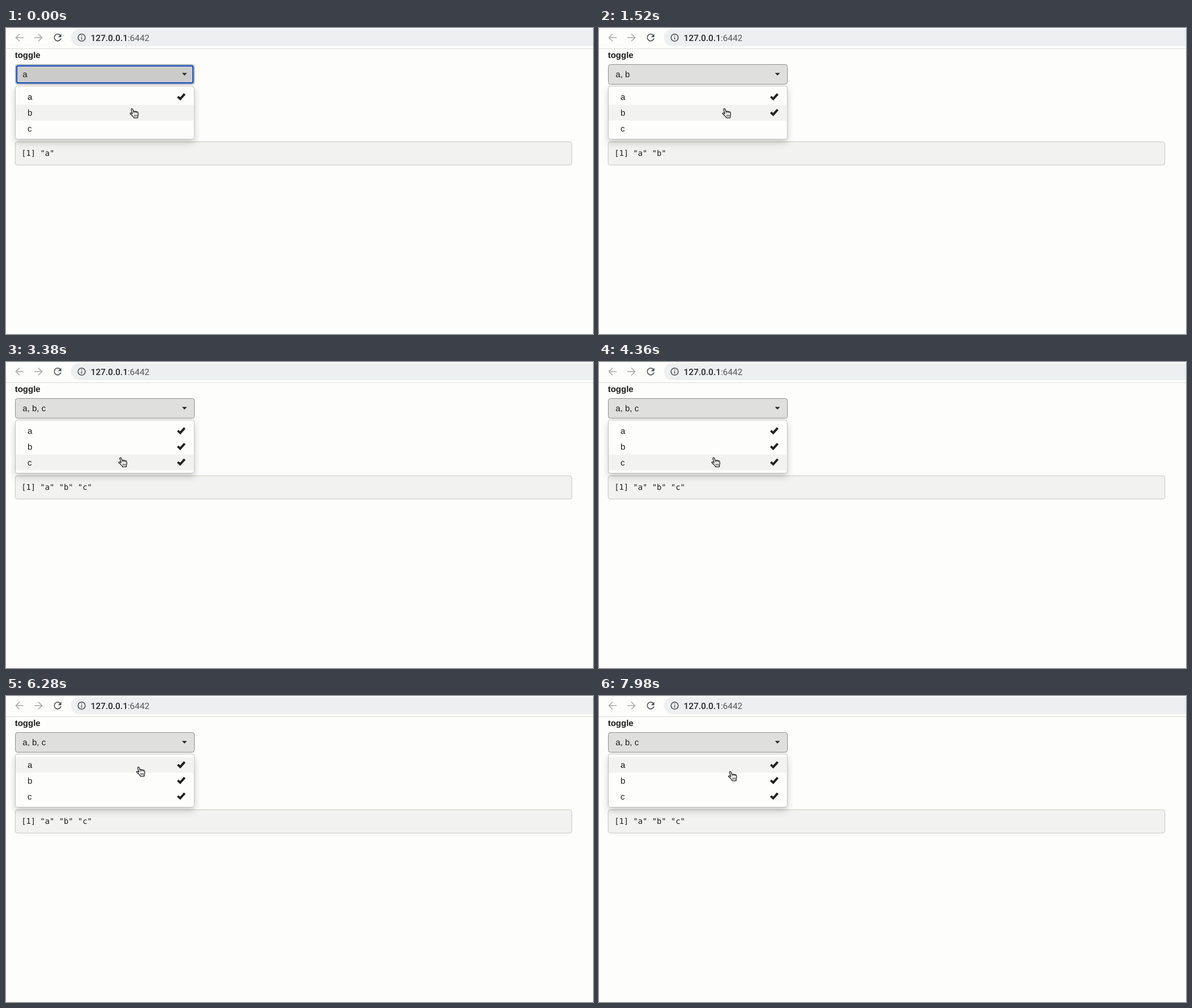
Recreate the animation shown at these times as an HTML page. Size 1036 by 541 pixels, loop 8000 ms.

```html
<!DOCTYPE html>
<html lang="en">
<head>
<meta charset="utf-8">
<title>Multi-select menu</title>
<style>
  html, body { margin: 0; width: 100%; height: 100%; overflow: hidden; background: #fdfdfb; }
  svg { display: block; width: 1036px; height: 541px; }
  text { font: 15px "Liberation Sans", sans-serif; fill: #1c1c1c; white-space: pre; text-rendering: geometricPrecision; }
  .label { font-weight: bold; }
  .url { font: 500 15.4px Roboto, sans-serif; fill: #242629; }
  .port { fill: #55585c; font-weight: 400; }
  .code { font: 13.8px "DejaVu Sans Mono", monospace; }
  .icon { fill: none; stroke-width: 1.6; }
</style>
</head>
<body>
<svg viewBox="0 0 1036 541">
  <defs>
    <filter id="shadow" x="-10%" y="-20%" width="120%" height="150%">
      <feDropShadow dx="0" dy="6" stdDeviation="6" flood-color="#000" flood-opacity=".19"/>
    </filter>
    <path id="check" d="M301.8 122.8 L304.6 120 L307.3 122.6 L313.9 115.2 L316.9 117.9 L307.6 128.2 Z" fill="#222"/>
  </defs>

  <!-- browser bar -->
  <path d="M0 36.5H1036" stroke="#dcdcd9"/>
  <rect x="114.5" y="2" width="960" height="30" rx="15" fill="#edeff0"/>
  <g class="icon" stroke="#a7a9ab">
    <path d="M31 17H18M24 10.5L17.5 17L24 23.5"/>
    <path d="M50 17H63M57 10.5L63.5 17L57 23.5"/>
  </g>
  <path class="icon" d="M95.7 12.8A6 6 0 1 0 97 18.5" stroke="#4a4d50" stroke-width="1.8"/>
  <path d="M97.6 10.4V16.2H91.8Z" fill="#4a4d50"/>
  <circle class="icon" cx="133.5" cy="17" r="6.3" stroke="#4a4d50" stroke-width="1.4"/>
  <path d="M133.5 16.2V20.4M133.5 13.2V14.8" stroke="#4a4d50" stroke-width="1.5"/>
  <text class="url" x="149.5" y="22.5">127.0.0.1<tspan class="port">:6442</tspan></text>

  <!-- page -->
  <text class="label" x="15.7" y="53">toggle</text>
  <rect x="16.2" y="201.2" width="982.5" height="41" rx="4" fill="#f2f2f0" stroke="#c5c6bb"/>
  <text class="code" id="output" x="27.2" y="225.8"></text>

  <rect id="button" x="16.5" y="64.5" width="316" height="35" rx="4" stroke="#8f8f8f"/>
  <g id="focus" fill="none">
    <rect x="17.4" y="65.4" width="314.2" height="33.2" rx="3" stroke="#f4f4f4" stroke-width=".9"/>
    <rect x="18.9" y="66.9" width="311.2" height="30.2" rx="2.5" stroke="#0f4bb8" stroke-width="2.2"/>
  </g>
  <text id="value" x="29.3" y="87.3"></text>
  <path d="M310.6 79.5H319.4L315 84Z" fill="#222"/>

  <rect x="16.5" y="102.5" width="315.8" height="94" rx="4" fill="#fdfdfc" stroke="#bfbfbf" filter="url(#shadow)"/>
  <rect id="hover" x="17" width="315" height="27.7" fill="#f2f2f1"/>
  <g id="rows"></g>

  <g id="hand" stroke="#181818" stroke-width="1.3" stroke-linejoin="round" stroke-linecap="round">
    <path fill="#fff" d="M5.2 10.2L3.1 3.4C2.4 1 4.8 .2 5.6 2.3L7.2 6.6C7.4 5.4 9.4 5.3 9.8 6.6C10.2 5.6 12 5.7 12.4 7C13 6.3 14.6 6.6 14.9 8C15.6 10.5 15.6 12.5 14.6 14.2L14.4 17.3H7.6L7.2 16C5.5 14.5 4 11.8 1.6 10.6C.3 9.6 1.3 8.3 2.7 8.6C3.8 8.8 4.5 9.5 5.2 10.2Z"/>
    <path fill="none" stroke-width=".9" d="M7.2 6.6L7.9 9M9.8 6.6L10.3 8.8M12.4 7L12.8 9M8.4 12L8.7 14.8M10.6 12V14.8M12.7 12V14.8"/>
  </g>
</svg>
<script>
const DURATION = 8000, ROW_TOP = 108.2, ROW_HEIGHT = 27.7;
const items = ["a", "b", "c"];
const selectedAt = [0, 840, 3160];

// time, x and y of the pointer's top left corner
const pointerPath = [
  [0, 218, 141.5], [1520, 217, 141.5], [2400, 216, 142], [3040, 198, 168],
  [4600, 198, 168], [5300, 225, 138], [5700, 225.5, 137.5],
  [6240, 229.5, 124.5], [6900, 229.5, 124.5], [7500, 227.5, 132.5], [8000, 227.5, 132.5]
];

const byId = id => document.getElementById(id);
const rows = byId("rows");
rows.innerHTML = items.map((item, i) => `
  <g transform="translate(0 ${i * ROW_HEIGHT})">
    <text x="38" y="127.2">${item}</text><use href="#check"/>
  </g>`).join("");
const checks = rows.querySelectorAll("use");

function pointerAt(time) {
  const next = pointerPath.findIndex(point => point[0] > time);
  const [t0, x0, y0] = pointerPath[next - 1];
  const [t1, x1, y1] = pointerPath[next];
  const p = (time - t0) / (t1 - t0);
  const eased = p * p * (3 - 2 * p);
  return [x0 + (x1 - x0) * eased, y0 + (y1 - y0) * eased];
}

function draw() {
  const time = performance.now() % DURATION;
  const selected = items.filter((item, i) => time >= selectedAt[i]);
  const focused = time < selectedAt[1];
  const [x, y] = pointerAt(time);
  const hovered = Math.max(0, Math.min(2, Math.floor((y + 0.5 - ROW_TOP) / ROW_HEIGHT)));

  byId("value").textContent = selected.join(", ");
  byId("output").textContent = "[1] " + selected.map(item => `"${item}"`).join(" ");
  byId("button").setAttribute("fill", focused ? "#cbcbca" : "#dfdfde");
  byId("focus").setAttribute("visibility", focused ? "visible" : "hidden");
  byId("hover").setAttribute("y", ROW_TOP + hovered * ROW_HEIGHT);
  byId("hand").setAttribute("transform", `translate(${x} ${y})`);
  checks.forEach((check, i) =>
    check.setAttribute("visibility", i < selected.length ? "visible" : "hidden"));
  requestAnimationFrame(draw);
}
draw();
</script>
</body>
</html>
```
